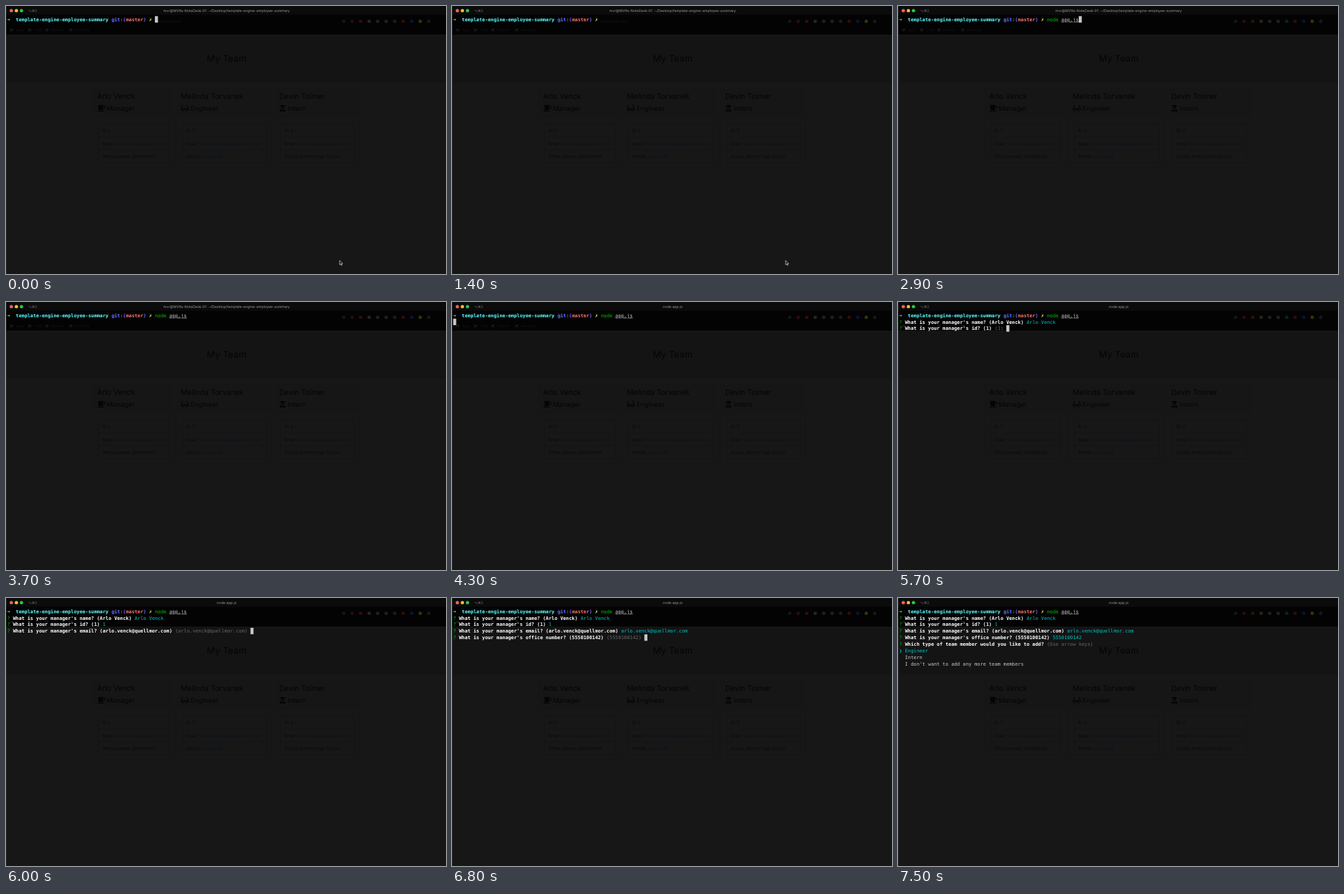
An HTML page that plays this animation: 662 px wide and 404 px high, repeating every 8 s.

```html
<!DOCTYPE html>
<html lang="en">
<head>
<meta charset="utf-8">
<title>Team builder</title>
<style>
html, body { margin: 0; width: 100%; height: 100%; overflow: hidden; background: #171717; }
svg { display: block; }
text { text-rendering: geometricPrecision; font-family: Inter, sans-serif; }
.page text { fill: #050505; }
.page .label { font-size: 6.1px; fill: #090909; }
.page .link { fill: #0b131e; }
.page .chrome { font-size: 5px; fill: #161616; }
.bar text { font-size: 5.35px; fill: #989898; }
.term text { font: 7.24px "DejaVu Sans Mono", monospace; fill: #c7c7c7; }
.term .bold { font-weight: bold; fill: #fff; }
.term .arrow { font-weight: bold; fill: #5ffa68; }
.term .dir { font-weight: bold; fill: #5ffdff; }
.term .git { font-weight: bold; fill: #6871ff; }
.term .branch { font-weight: bold; fill: #ff6e67; }
.term .dirty { font-weight: bold; fill: #fefb67; }
.term .ok { fill: #00c200; }
.term .file { text-decoration: underline; }
.term .dim { fill: #686868; }
.term .answer { fill: #00c5c7; }
</style>
</head>
<body>
<svg width="662" height="404" viewBox="0 0 662 404">
  <rect width="662" height="404" fill="#171717"/>
  <rect y="43" width="662" height="73" fill="#141414"/>
  <rect width="662" height="43" fill="#030303"/>
  <rect width="662" height="13.5" fill="#0b0b0b"/>
  <rect width=".6" height="404" fill="#333"/>
  <g class="page" id="page"></g>
  <g class="bar">
    <circle cx="8" cy="7" r="2.5" fill="#ff5f57"/>
    <circle cx="15.6" cy="7" r="2.5" fill="#febc2e"/>
    <circle cx="23.3" cy="7" r="2.5" fill="#28c840"/>
    <text x="33" y="9" style="font: 5px 'DejaVu Sans', sans-serif; fill: #777">⌥⌘2</text>
    <text id="title" x="332" y="8.9" text-anchor="middle"></text>
  </g>
  <g class="term" id="term"></g>
  <path id="mouse" d="M502 383.6v6.4l1.5-1.3 1 2.3 1-.4-1-2.2h2z" fill="#000" stroke="#eee" stroke-width=".7"/>
</svg>
<script>
const $ = id => document.getElementById(id);
const LOOP = 8000, CELL = 4.358, LEFT = 1.75, TOP = 15.3, LINE = 9.87;
const manager = { name: "Arlo Venck", email: "arlo.venck@quellmor.com", phone: "5550100142" };

const label = (x, y, key, value, cls = "") =>
  `<text class="label" x="${x}" y="${y}">${key}: <tspan class="${cls}">${value}</tspan></text>`;

const icons = {
  mug: `<path d="M2 0h7v1h1a2.2 2.2 0 0 1 0 5H9a2 2 0 0 1-2 2H4a2 2 0 0 1-2-2zM9 2.3v2.4h1a1.2 1.2 0 0 0 0-2.4zM0 8.6h11l-1 1.4H1z" fill-rule="evenodd"/>`,
  glasses: `<path d="M.7 6 2 1.3Q2.4.4 3.6 1M11.3 6 10 1.3Q9.6.4 8.4 1M.7 5.6h4.2v1.2a2 2 0 0 1-4.2 0zM7.1 5.6h4.2v1.2a2 2 0 0 1-4.2 0zM5 6h2" fill="none" stroke="#050505" stroke-width="1.2"/>`,
  graduate: `<path d="M0 1.6 5 0l5 1.6L5 3.2zM2.3 3l2.7.8L7.7 3a2.7 2.7 0 1 1-5.4 0zM.6 10V8.6Q.8 6.8 3 6.6L5 8.6l2-2q2.2.2 2.4 2V10z"/>`
};

const card = (x, w, name, role, icon, id, email, extra) => `
  <rect x="${x - 7}" y="124" width="${w + 16}" height="120" fill="none" stroke="#151515" stroke-width=".6"/>
  <rect x="${x - 7}" y="124" width="${w + 16}" height="44" fill="#161616"/>
  <path d="M${x + 2} 178h${w}v58h${-w}zm0 19.5h${w}m${-w} 19.5h${w}" fill="none" stroke="#141414" stroke-width=".6"/>
  <text x="${x}" y="139.7" font-size="11.2">${name}</text>
  <g transform="translate(${x} 149)" fill="#050505">${icons[icon]}</g>
  <text x="${x + (icon == "graduate" ? 13 : 14.5)}" y="157.8" font-size="10.1">${role}</text>
  ${label(x + 8, 190.2, "ID", id)}
  ${label(x + 8, 209.6, "Email", email, "link")}
  ${label(x + 8, 228.8, ...extra)}`;

const bookmarks = [[8, "Apps"], [35, "Code"], [61, "Kanban"], [97, "Learning"]];
const tools = ["#151515", "#2c0b0b", "#350b0b", "#25261a", "#1b2226", "#202020",
               "#152016", "#300b0e", "#0a1238", "#39300a", "#181818"];

$("page").innerHTML =
  bookmarks.map(([x, s]) => `<rect x="${x - 2}" y="34" width="5" height="4" rx=".6" fill="#131313"/>
    <text class="chrome" x="${x + 7}" y="37.8">${s}</text>`).join("") +
  `<text class="chrome" x="222" y="24.8">/output/team.html</text>` +
  tools.map((c, i) => `<circle cx="${508 + i * 12.8}" cy="23" r="2.6" fill="${c}"/>`).join("") +
  `<text x="332" y="83.7" font-size="13.8" text-anchor="middle">My Team</text>` +
  card(137, 106, manager.name, "Manager", "mug", 1, manager.email, ["Office number", manager.phone]) +
  card(263, 128, "Melinda Torvanek", "Engineer", "glasses", 2, "melinda.torvanek@quellmor.com", ["GitHub", "mtorvanek", "link"]) +
  card(411, 111, "Devin Tolmer", "Intern", "graduate", 3, "devin.tolmer@quellmor.com", ["School", "Elmford High School"]);

// Each question: shown at, answered at, wording, default
const questions = [
  [4400, 5200, "name", manager.name],
  [5200, 6000, "id", "1"],
  [6000, 6800, "email", manager.email],
  [6800, 7300, "office number", manager.phone]
];
const cursorOff = [[400, 900], [1400, 1900], [2400, 2600], [3500, 4000], [6500, 6800], [7300, LOOP]];

function screen(t) {
  const prompt = [["arrow", "➜"], ["dir", "  template-engine-employee-summary"], ["git", " git:("],
                  ["branch", "master"], ["git", ")"], ["dirty", " ✗"], ["", " "]];
  if (t >= 1900) prompt.push(["ok", "node"], ["", " "]);
  if (t >= 2600) prompt.push(["file", "app.js"]);
  const rows = [prompt];
  for (const [start, end, what, value] of questions) {
    if (t < start) continue;
    rows.push([["ok", "?"], ["bold", ` What is your manager's ${what}? (${value})`],
               ...(t < end ? [["dim", ` (${value})`], ["", " "]] : [["answer", " " + value]])]);
  }
  if (t >= 4000 && t < 4400) rows.push([]);
  if (t >= 7300) rows.push(
    [["ok", "?"], ["bold", " Which type of team member would you like to add?"], ["dim", " (Use arrow keys)"]],
    [["answer", "❯"], ["answer", " Engineer"]],
    [["", "  Intern"]],
    [["", "  I don't want to add any more team members"]]);
  return rows;
}

function terminal(t) {
  let out = "", col, y;
  screen(t).forEach((row, r) => {
    col = 0;
    y = TOP + r * LINE;
    for (const [cls, s] of row) {
      const lead = s.search(/\S/);
      if (lead >= 0) out += `<text class="${cls}" x="${LEFT + (col + lead) * CELL}" y="${y + 7.4}">${s.trim()}</text>`;
      col += s.length;
    }
  });
  if (!cursorOff.some(([a, b]) => t >= a && t < b))
    out += `<rect x="${LEFT + col * CELL}" y="${y}" width="4.6" height="9.7" fill="#c7c7c7"/>`;
  return out;
}

let shown;
function frame(now) {
  const t = now % LOOP, next = terminal(t);
  if (next !== shown) {
    $("term").innerHTML = shown = next;
    $("title").textContent = t < 4000
      ? "mvr@MVRs-NoteDesk-01: ~/Desktop/template-engine-employee-summary" : "node app.js";
    $("mouse").style.display = t < 1900 ? "" : "none";
  }
  requestAnimationFrame(frame);
}
frame(0);
</script>
</body>
</html>
```
